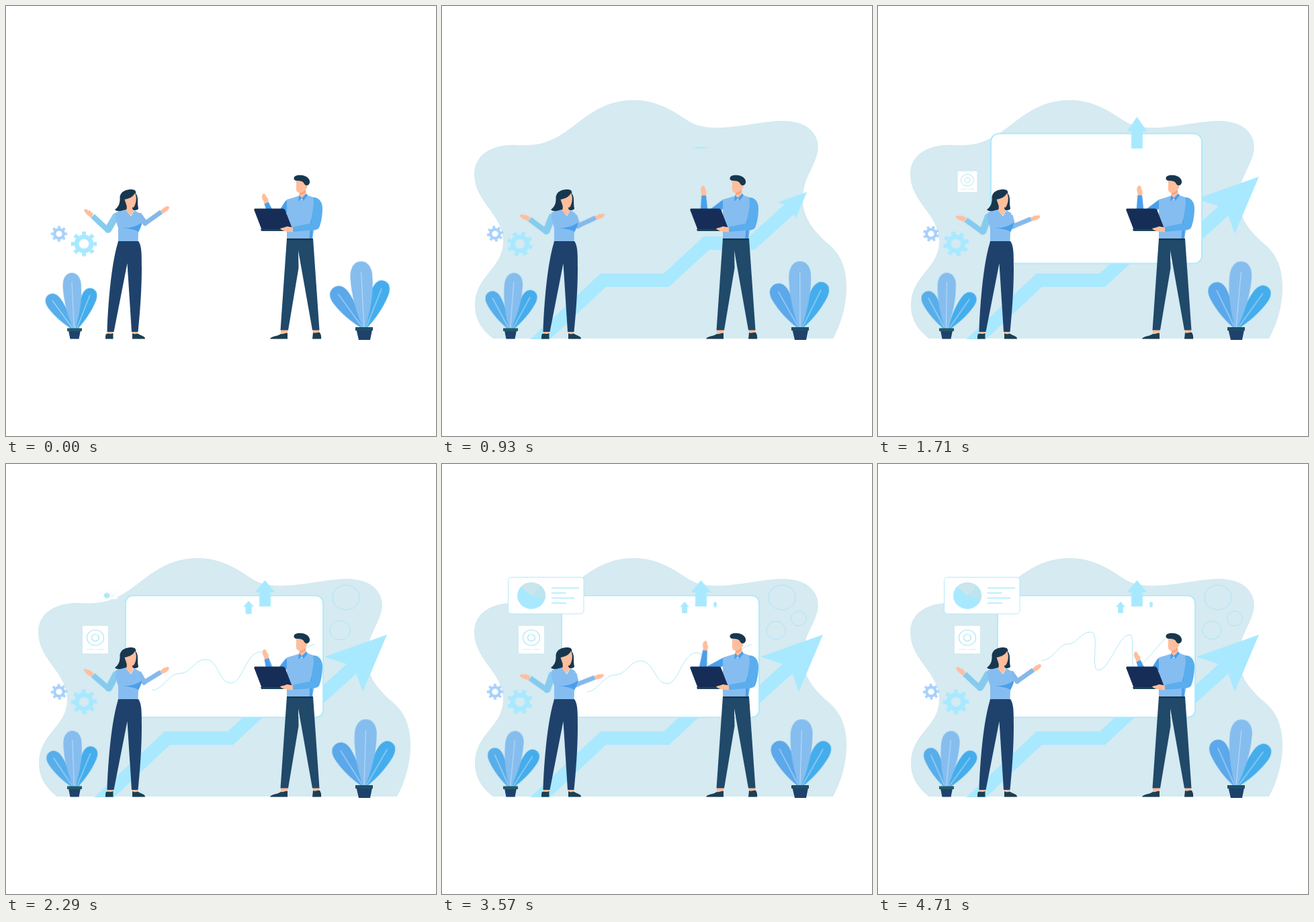
Write an HTML page that moves like this. It is 640 by 640 pixels and loops after 4.78 s.

```html
<!DOCTYPE html>
<html lang="en">
<head>
<meta charset="utf-8">
<title>Growth presentation</title>
<style>
  html, body { margin: 0; width: 100%; height: 100%; overflow: hidden; background: #fff; }
  svg { display: block; width: 100vw; height: 100vh; }
  .sky { fill: #a8e9ff; }
  .thin { fill: none; stroke: #a8e5f7; stroke-width: .9; }
  .skin { fill: #ffbe9d; }
  .hair { fill: #17374f; }
  .shirt { fill: #86bdf0; }
  .deep { fill: #4a9feb; }
  .pants { fill: #1f426c; }
  .shoe { fill: #1b3f53; }
  .upper { fill: none; stroke-linecap: round; }
  .fore { fill: none; }
  .vein { fill: none; stroke: #d3eafc; stroke-width: .8; vector-effect: non-scaling-stroke; }
</style>
</head>
<body>
<svg viewBox="0 0 640 640">
  <defs>
    <g id="gear" fill="none" stroke="currentColor">
      <circle r="10.9" stroke-width="7"/>
      <circle r="16.4" stroke-width="5.6" pathLength="8" stroke-dasharray=".46 .54" stroke-dashoffset=".23"/>
    </g>
    <g id="leaf">
      <path d="M-.1 0C-.6-.22-1-.5-1-.76C-1-.91-.6-1 0-1S1-.91 1-.76C1-.5.6-.22.1 0Z"/>
      <path class="vein" d="M0 0V-.84"/>
    </g>
    <path id="up" class="sky" d="M0-39L15-21H8.5V0H-8.5V-21H-15Z"/>
    <clipPath id="floor"><path d="M0 0H640V495.5H0Z"/></clipPath>
  </defs>

  <path id="blob" fill="#d5eaf1" style="transform-origin:325px 495px" d="M76 495C62 484 49 469 49 446C49 400 91 392 91 350C91 310 48 292 48 250C48 222 74 205 112 207C150 209 168 200 199 176C224 157 247 140 286 140C322 140 348 159 368 172C392 186 425 181 460 176C500 170 520 168 540 178C557 188 563 203 558 222C553 240 539 257 537 283C535 312 552 335 575 354C595 371 602 392 602 420C602 446 594 473 582 495Z"/>

  <g clip-path="url(#floor)">
    <path id="shaft" fill="none" stroke="#a8e9ff" stroke-width="20" pathLength="1" stroke-dasharray="1 2" d="M129 512L240 408H334L393.5 353H461L523 297"/>
  </g>
  <path id="head" class="sky" style="transform-origin:522px 297px" d="M567 254L531 339L521 311L505 297L474 287Z"/>

  <rect id="board" x="178" y="196" width="294" height="181" rx="11" fill="#fff" stroke="#a8e9ff" stroke-width="1.7" style="transform-origin:325px 286.5px"/>
  <path id="curve" class="thin" pathLength="1" stroke-dasharray="1 2"/>

  <g transform="translate(385.5 212)"><g id="up1"><use href="#up"/></g></g>
  <g transform="translate(361 213.5)"><g id="up2"><use href="#up" transform="translate(0 8.5) scale(.46 .44)"/></g></g>
  <g transform="translate(406.5 209)"><g id="up3"><use href="#up" transform="translate(0 4.2) scale(.24 .22)"/></g></g>

  <ellipse id="ring1" class="thin" cx="506" cy="198.5" rx="20" ry="18.5" style="transform-origin:506px 198.5px"/>
  <ellipse id="ring2" class="thin" cx="497" cy="247.5" rx="14.3" ry="13.3" style="transform-origin:497px 247.5px"/>
  <ellipse id="ring3" class="thin" cx="531" cy="230" rx="11.5" ry="11" style="transform-origin:531px 230px"/>

  <g id="badge" style="transform-origin:133px 261.5px">
    <rect x="114" y="241" width="38" height="41" rx="1.5" fill="#fff"/>
    <g class="thin" style="stroke-width:1.2">
      <ellipse cx="133" cy="258.5" rx="12.5" ry="11.5"/>
      <ellipse cx="133" cy="258.5" rx="5.5" ry="5"/>
      <path opacity=".6" d="M120 276H132M135 276H146"/>
    </g>
  </g>

  <g id="card" style="transform-origin:154.5px 195.5px">
    <rect x="98.5" y="168.5" width="112.5" height="54.5" rx="5" fill="#fff" stroke="#b5e9fb"/>
    <ellipse class="sky" cx="133" cy="196" rx="21" ry="19.7"/>
    <path fill="#cbe5ec" d="M133 196L117.5 182.7A21 19.7 0 0 1 147.5 181.7Z"/>
    <path fill="#bce5f0" d="M133 196L147.5 181.7A21 19.7 0 0 1 153 202.5Z"/>
    <path stroke="#a8e9ff" stroke-width="1.4" d="M163 184.5H204M163 192H184.5M163 199.5H197M163 207H185"/>
  </g>

  <g transform="translate(116 354) scale(1 .96)" color="#a8e9ff"><g id="gear1"><use href="#gear"/></g></g>
  <g transform="translate(79 339) scale(.63 .61)" color="#a6d0fb"><g id="gear2"><use href="#gear"/></g></g>

  <!-- plants -->
  <g transform="translate(100 481) rotate(-36)"><g id="la"><use href="#leaf" fill="#57aeea" transform="scale(11.5 63)"/></g></g>
  <g transform="translate(105 481) rotate(21.5)"><g id="lc"><use href="#leaf" fill="#45adec" transform="scale(11.3 65)"/></g></g>
  <g transform="translate(101.5 481) rotate(-2.8)"><g id="lb"><use href="#leaf" fill="#85bdee" transform="scale(13.8 84)"/></g></g>
  <path class="pants" d="M93 483H111L108.5 495.5H95.5Z"/>
  <path fill="#205a6b" d="M91 479.5H113V484H91Z"/>

  <g transform="translate(531 479) rotate(-36)"><g id="ra"><use href="#leaf" fill="#5ba8ea" transform="scale(14 74)"/></g></g>
  <g transform="translate(536 479) rotate(21.5)"><g id="rc"><use href="#leaf" fill="#45adec" transform="scale(13 75)"/></g></g>
  <g transform="translate(533 479) rotate(-3)"><g id="rb"><use href="#leaf" fill="#85bdee" transform="scale(16.6 99)"/></g></g>
  <path class="pants" d="M521.5 482H545L542 497H525Z"/>
  <path fill="#1d4e66" d="M520 478H546V483H520Z"/>

  <!-- woman -->
  <g id="wl1" style="transform-origin:168px 312px">
    <g id="wl2" style="transform-origin:152px 333px">
      <g id="wl3" class="skin" style="transform-origin:128px 312px">
        <path d="M130 309L126 306C125 304 124 303 123 305C121 302 117 301 116 304C118 308 121 312 127 315Z"/>
      </g>
      <path class="fore" stroke="#86cbee" stroke-width="8" d="M153 335L129 312.5"/>
    </g>
    <path class="upper" stroke="#86cbee" stroke-width="10.5" d="M163.5 313L152 332.5"/>
  </g>
  <g id="wr1" style="transform-origin:192px 309px">
    <g id="wr2" style="transform-origin:207px 323px">
      <g id="wr3" class="skin" style="transform-origin:231px 307px">
        <path d="M229.500 305L233 302C235 299 236 299 237 300C239 297 242 297 243 300C242 304 238 307 233 309Z"/>
      </g>
      <path class="fore" stroke="#85b8ec" stroke-width="7" d="M205 325L231 306.5"/>
    </g>
    <path class="upper" stroke="#85b8ec" stroke-width="8" d="M199 312L207 323"/>
  </g>
  <path class="hair" d="M169.5 284C171 275 180 273 187 273C193 273 194 277 193 279C198 284 195 294 197 301C197 304 191 305 187 303L178 305C172 306 164 306 162 303C168 299 170 293 169.5 284Z"/>
  <path class="shirt" d="M164 307L178 303L186 313L191 304L198 308C200 314 202 319 202 325L197 336L196.5 350.5H167V330C164 322 162 312 164 307Z"/>
  <path class="deep" d="M172 330.5C184 331 194 328 202 322.5C202 328 199 332 197.5 336C190 332 182 331 172 330.5Z"/>
  <path class="skin" d="M176.5 288C183 287 189 284 192 278.5C195 284 194 293 191 298C190 300 189 300 187.5 300L190 305L186 312L178 304C180 303 180 300 179.5 297Z"/>
  <path class="skin" d="M151 484H159V489H151ZM188 484H196V489H188Z"/>
  <path class="pants" d="M167 350H197C202 357 202 368 202 390C202 425 199 460 196.5 485H187L180.5 383L160.5 485H150.5C152 440 157 385 166 354Z"/>
  <path class="shoe" d="M149 488C152 487 155 489 159.5 487V495.5H148C148 492 148 490 149 488ZM188 487C192 490 195 487 197 488C201 491 207 491 207 495.5H188Z"/>

  <!-- man -->
  <g id="m1" style="transform-origin:420px 293px">
    <g id="m2" style="transform-origin:400px 324px">
      <g id="m3" class="skin" style="transform-origin:387.5px 293px">
        <path d="M385 295C384 290 380 287 381 283C381 280 384 278 385 280C387 281 387 283 388 285C390 284 391 290 390.5 294Z"/>
      </g>
      <path class="deep" d="M384.5 294.5L390.8 292L406 322L394 326Z"/>
    </g>
    <path class="upper" stroke="#4a9feb" stroke-width="11" d="M420 294L401 324"/>
  </g>
  <path class="skin" d="M409 481H419V489H409ZM457 481H466V488H457Z"/>
  <path fill="#20496a" d="M418 346H457L466.5 482.5H456L435 364L435.5 390L420 482.5H408.5Z"/>
  <path class="shoe" d="M409 488C413 489 416 486 419 487V495.5H393C395 491 404 492 409 488ZM457 486C460 488 464 485 467 486C469 489 469.5 492 469 495.5H456Z"/>
  <path class="shirt" d="M418 288L435 283L441 289L448 281.5L461 286V320L456 346H418Z"/>
  <path class="deep" d="M457 308L456 346.5H451.5L453 322Z"/>
  <path fill="#17384d" d="M418 346H456.5V348.5H418Z"/>
  <path class="skin" d="M432 259L444 261C445 266 449 265 448.5 269C448 272 446 272 446 274L447 281L440 287L436 283L437 278C433 278 431 274 432 268Z"/>
  <path fill="#f9a27f" d="M437 278C441 278 444 276 445.5 273L446 277C442 280 440 281 437 281Z"/>
  <path class="deep" d="M436 281L440.5 286L435 291ZM447 279L449 282L442.5 290L440 286Z"/>
  <path class="hair" d="M428.5 257C428 252 435 251 441 252C448 253 453 258 452 263C451 268 446 268 444 265C443 261 438 260 433 260C430 260 429 259 428.5 257Z"/>
  <path fill="#162e57" d="M371 301.5H412C414 301.5 415 303 415.5 304L426 331L424 334H381L369.5 304C369 302.500 369.5 301.5 371 301.5Z"/>
  <path fill="#1b4356" d="M379 332H417V335H380Z"/>
  <path fill="#5aaeed" d="M457 285C464 284 471 290 471 301C471 312 469 323 466 330C464 333 459 334 453 334L427 336L426 329L455 323C453 312 460 300 457 285Z"/>
  <path class="skin" d="M427 329.5L418 328C414 330 410 330 408 331.5C411 334 414 336 427 336.5Z"/>
</svg>
<script>
  const LOOP = 4780;
  const el = id => document.getElementById(id);

  // keys: [ms, value] pairs; the end values are held to both ends of the loop
  function play(id, keys, style, easing = 'linear') {
    const all = [[0, keys[0][1]], ...keys, [LOOP, keys[keys.length - 1][1]]];
    const frames = all.map(([t, v]) => ({ offset: t / LOOP, easing, ...style(v) }));
    el(id).animate(frames, { duration: LOOP, iterations: Infinity });
  }

  const scale = v => ({ transform: `scale(${v})` });
  const scaleY = v => ({ transform: `scale(1, ${v})` });
  const turn = deg => v => ({ transform: `rotate(${deg * v}deg)` });
  const trim = v => ({ strokeDashoffset: v });
  const pop = (id, start, peak, end, over, style = scale) =>
    play(id, [[start, 0], [peak, over], [end, 1]], style, 'ease-in-out');

  play('blob', [[575, '0, 0'], [770, '1.06, .96'], [910, '1, 1']], scale, 'ease-in-out');
  play('shaft', [[600, 1.01], [900, 0]], trim);
  pop('head', 700, 1200, 1420, 1.08);
  pop('up1', 800, 1650, 2050, 1.22, scaleY);
  pop('board', 1140, 1700, 2050, 1.068);
  pop('badge', 1400, 1900, 2200, 1.08);
  pop('up2', 1620, 2290, 2600, 1.15);
  pop('ring1', 1790, 2150, 2290, 1.07);
  pop('ring2', 1900, 2290, 2500, 1.07);
  pop('up3', 2150, 2800, 3000, 1.15);
  pop('card', 2120, 2680, 2920, 1.06);
  pop('ring3', 2300, 2700, 2900, 1.07);

  const low = 'M216 339C232 339 240 314 258 314C274 314 279 293 296 293C315 293 317 327 335 327C353 327 357 281 379 281C392 281 394 300 400 303C425 310 440 270 461 269';
  const high = 'M243 292C258 294 270 268 281 268C297 269 300 250 317 250C331 252 315 307 328 307C344 307 358 254 375 254C382 256 376 300 381 303C392 306 415 270 428 260';
  el('curve').setAttribute('d', low);
  play('curve', [[1780, 1.01], [2240, 0]], trim);
  play('curve', [[2250, low], [3080, high], [3570, low], [4600, high]], d => ({ d: `path("${d}")` }));

  play('gear1', [[0, 0], [LOOP, 1]], turn(90));
  play('gear2', [[0, 0], [LOOP, 1]], turn(180));

  // sway of each leaf, 0 = leaning left, 1 = leaning right
  const sway = (id, deg, keys) => play(id, [[0, 0], ...keys], turn(deg));
  sway('la', 12, [[930, .64], [1300, .95], [1710, .64], [2290, .18], [2550, 0], [3000, .45], [3570, 1]]);
  sway('lb', 8.5, [[930, .85], [1200, 1], [1710, .42], [2290, .08], [2400, 0], [3000, .67], [3570, 1]]);
  sway('lc', 14.5, [[930, .5], [1500, 1], [1710, .93], [2290, .07], [2400, 0], [3000, .43], [3570, .79], [4100, 1]]);
  sway('ra', 12, [[930, .54], [1500, .95], [1710, .85], [2290, .31], [2700, .08], [3000, .23], [3570, .69], [4300, 1]]);
  const late = [[570, .1], [930, .34], [1710, .95], [1790, 1], [2290, .56], [2850, 0], [3000, .1], [3570, .55], [4450, 1]];
  sway('rb', 8.5, late);
  sway('rc', 15, late);

  // each joint turns about its parent, so the angles add up along an arm
  const wave = [[0, 0], [500, 1.3], [930, .7], [1710, .72], [2290, .2], [3000, .58], [3570, 1], [3750, 1.25], [4600, 0]];
  const talk = [[0, 0], [500, 1], [930, .75], [1710, .92], [2290, .27], [3000, .6], [3570, 1], [3750, 1.05], [4600, 0]];
  const arm = (id, keys, angles) => angles.forEach((deg, i) => play(id + (i + 1), keys, turn(deg)));
  arm('m', wave, [29, 0, -8]);
  arm('wl', talk, [-12, 4, -14]);
  arm('wr', talk, [24, -10, 5]);
</script>
</body>
</html>
```
